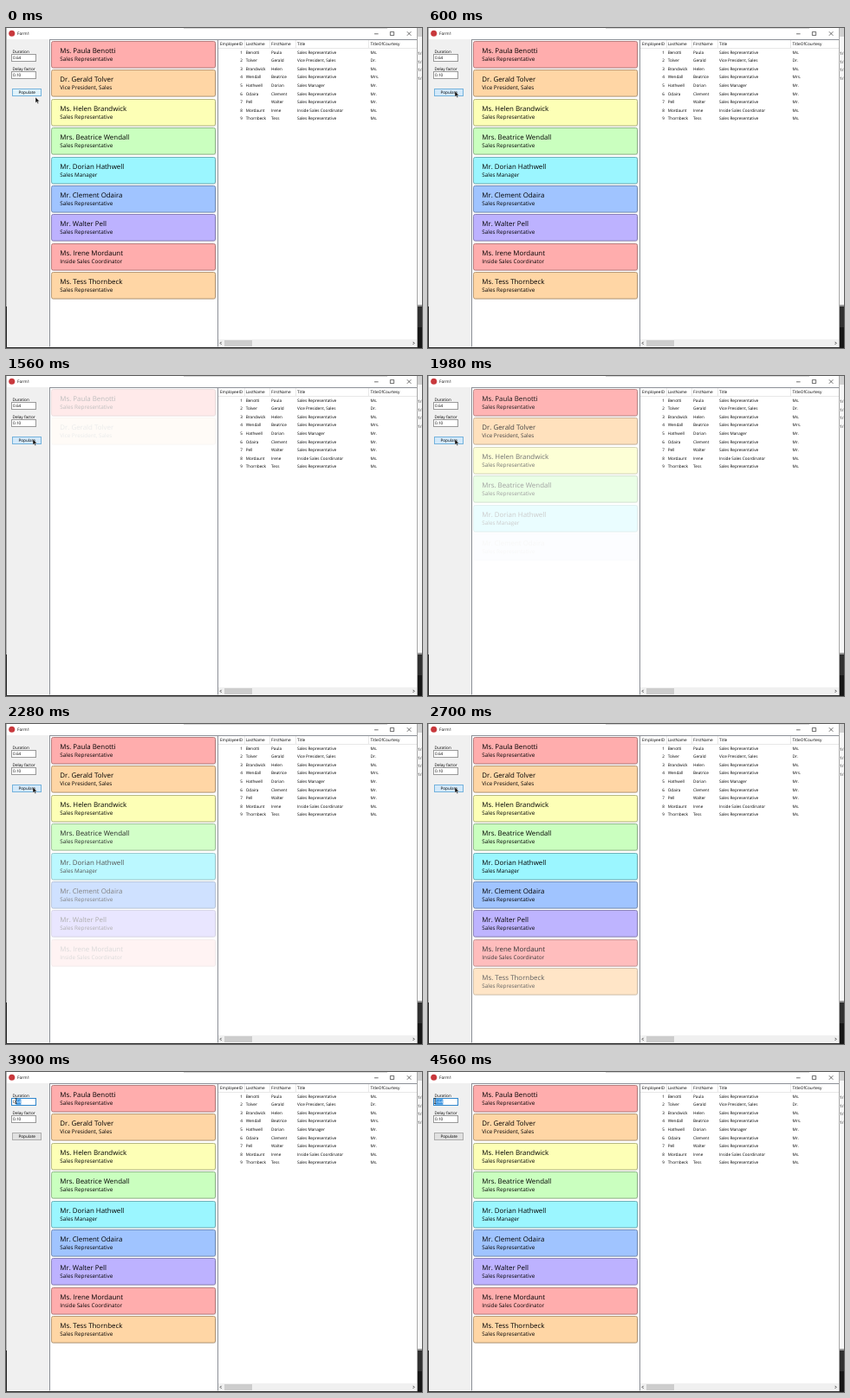
Write an HTML page that moves like this. It is 480 px wide and 370 px high and loops after 4.62 s.

```html
<!DOCTYPE html>
<html lang="en">
<head>
<meta charset="utf-8">
<title>Form1</title>
<style>
  html, body { margin: 0; width: 100%; height: 100%; overflow: hidden; background: #fff; }
  svg { display: block; width: 480px; height: 370px; }
  text {
    font-family: "Open Sans", "Noto Sans", sans-serif; font-size: 4.7px; fill: #000;
    white-space: pre; text-rendering: geometricPrecision;
  }
  .name { font-size: 7.9px; }
  .job { font-size: 6.33px; }
  .end { text-anchor: end; }
  .mid { text-anchor: middle; }
</style>
</head>
<body>
<svg id="stage" viewBox="0 0 480 370" xmlns="http://www.w3.org/2000/svg"></svg>
<script>
const LOOP = 4620, CLEAR = 1400, STEP = 113, FADE = 640, FOCUS = 3600;
const PITCH = 33.4, ROW = 9.55;
const colors = ['#ffadad', '#ffd6a5', '#fdffb6', '#caffbf', '#9bf6ff', '#a0c4ff', '#bdb2ff'];
const rep = 'Sales Representative';
const people = [
  ['Benotti', 'Paula', rep, 'Ms.'],
  ['Tolver', 'Gerald', 'Vice President, Sales', 'Dr.'],
  ['Brandwick', 'Helen', rep, 'Ms.'],
  ['Wendall', 'Beatrice', rep, 'Mrs.'],
  ['Hathwell', 'Dorian', 'Sales Manager', 'Mr.'],
  ['Odaira', 'Clement', rep, 'Mr.'],
  ['Pell', 'Walter', rep, 'Mr.'],
  ['Mordaunt', 'Irene', 'Inside Sales Coordinator', 'Ms.'],
  ['Thornbeck', 'Tess', rep, 'Ms.']
];

const rect = (x, y, w, h, fill, more = '') =>
  `<rect x="${x}" y="${y}" width="${w}" height="${h}" fill="${fill}" ${more}/>`;
const box = (x, y, w, h, fill, stroke, more = '') =>
  rect(x + .5, y + .5, w - 1, h - 1, fill, `stroke="${stroke}" ${more}`);
const label = (x, y, s, cls = '') => `<text x="${x}" y="${y}" class="${cls}">${s}</text>`;
const line = (d, color, width = 1) =>
  `<path d="${d}" fill="none" stroke="${color}" stroke-width="${width}"/>`;

function desktop() {
  let s = rect(0, 0, 480, 370, '#fff') + rect(475, 0, 5, 10, '#d0d0d0') +
    rect(475, 10, 5, 310, '#f7f7f7') + rect(475, 320, 5, 2, '#9a9a9a') +
    rect(475, 322, 5, 24, '#303030') + rect(475, 346, 5, 24, '#161616');
  for (let i = 0; i < 4; i++) s += label(475, 31.3 + i * ROW, '1/');
  return s + line('M474.5 0V369', '#a8a8a8');
}

function frame() {
  return rect(0, 0, 474, 369, '#fff') + rect(1, 13, 50, 355, '#f0f0f0') +
    rect(0, 0, 1, 322, '#b4b4b4') + rect(0, 322, 1, 48, '#222') +
    rect(0, 369, 475, 1, '#333') + rect(205, 0, 235, .6, '#bbb') +
    '<circle cx="6.7" cy="6.3" r="3.5" fill="#c8383c"/>' + label(13, 8.3, 'Form1') +
    line('M425 6.8h4.6M443.4 4.4h4.2v4.2h-4.2zM462.8 4.2l4.6 4.6m0-4.6l-4.6 4.6', '#333', .7) +
    line('M51 13.5H474M50.5 13V368.5M244.5 13V368.5', '#8c9097');
}

function form() {
  return label(7.5, 28.8, 'Duration') + label(7.5, 48.8, 'Delay factor') +
    box(6, 30, 29, 9, '#fff', '#999', 'id="field"') + label(8, 36.3, '0.64') +
    rect(8, 31.3, 0, 6.4, '#3390e0', 'id="mark"') +
    `<clipPath id="picked">${rect(8, 31, 0, 7, '#000', 'id="pickedBox"')}</clipPath>` +
    '<g clip-path="url(#picked)"><text x="8" y="36.3" style="fill:#fff">0.64</text></g>' +
    box(6, 50, 29, 9, '#fff', '#999') + label(8, 56.4, '0.10') +
    box(7, 70, 34, 9, '#e1e1e1', '#adadad', 'id="button"') + label(24.2, 76.3, 'Populate', 'mid');
}

function card([last, first, job, title], i) {
  const clip = (id, y, h) => `<clipPath id="${id}">${rect(55, y, 185, h, '#000')}</clipPath>`;
  const fill = colors[i % colors.length];
  return `<g class="card" transform="translate(0 ${Math.round(15 + i * PITCH)})">` +
    rect(52, 0, 191, 32, '#000', 'rx="3" opacity=".1"') +
    rect(52.5, .5, 189, 30.5, fill, `rx="2" stroke="color-mix(in srgb, ${fill} 72%, #000)"`) +
    clip('n' + i, 4, 11.1) + clip('j' + i, 16, 8.6) +
    `<g clip-path="url(#n${i})">${label(62.3, 14, `${title} ${first} ${last}`, 'name')}</g>` +
    `<g clip-path="url(#j${i})">${label(62.3, 23.3, job, 'job')}</g></g>`;
}

function grid() {
  const cols = [276.7, 306, 336, 420.5];
  let s = label(247, 20.3, 'EmployeeID') +
    ['LastName', 'FirstName', 'Title', 'TitleOfCourtesy'].map((h, i) => label(cols[i], 20.3, h)).join('') +
    line('M275.5 14V23M304.5 14V23M334.5 14V23M418.5 14V23M245 23.5H474', '#e2e2e2', .8);
  people.forEach(([last, first, job, title], i) => {
    const y = 29.8 + i * ROW;
    s += label(273, y, i + 1, 'end');
    [last, first, job, title].forEach((v, c) => s += label(cols[c], y, v));
  });
  return s + rect(245, 360, 229, 8.6, '#f0f0f0') + rect(252, 361, 32, 7, '#cdcdcd') +
    line('M248.6 362.9l-1.5 1.5 1.5 1.5M469.6 362.9l1.5 1.5-1.5 1.5', '#333', .9);
}

const pointer = '<path id="arrow" d="M0 0V6.6L1.5 5.2 2.6 7.6 3.7 7.1 2.6 4.8H4.7Z" fill="#111" stroke="#fff" stroke-width=".4"/>' +
  '<path id="beam" d="M-1.2 -3h2.4M0 -3V3M-1.2 3h2.4" fill="none" stroke="#222" stroke-width=".7"/>';

const stage = document.getElementById('stage');
stage.innerHTML = desktop() + frame() + form() + people.map(card).join('') + grid() + pointer;
const [field, mark, pickedBox, button, arrow, beam] =
  ['field', 'mark', 'pickedBox', 'button', 'arrow', 'beam'].map(id => document.getElementById(id));
const cards = [...stage.querySelectorAll('.card')];

const clamp = v => Math.max(0, Math.min(1, v));
const ease = v => v * v * (3 - 2 * v);

// Pointer stops: start, end, x, y
const moves = [[120, 480, 31, 73], [2760, 3180, 26, 33], [FOCUS, 4020, 8, 33.5]];
function pointerAt(t) {
  let x = 34, y = 80;
  for (const [from, to, nx, ny] of moves) {
    const k = ease(clamp((t - from) / (to - from)));
    x += (nx - x) * k;
    y += (ny - y) * k;
  }
  return [x, y];
}

function draw(t) {
  cards.forEach((c, i) => {
    c.style.opacity = t < CLEAR ? 1 : clamp((t - CLEAR - i * STEP) / FADE);
  });

  const [x, y] = pointerAt(t);
  const overField = y < 40, focused = t >= FOCUS;
  arrow.style.display = overField ? 'none' : '';
  beam.style.display = overField ? '' : 'none';
  (overField ? beam : arrow).setAttribute('transform', `translate(${x.toFixed(2)} ${y.toFixed(2)})`);

  const hover = y > 69;
  button.setAttribute('fill', hover ? (t < 300 ? '#e0f3fb' : '#d3e9fa') : '#e1e1e1');
  button.setAttribute('stroke', focused ? '#adadad' : hover ? '#74b2dc' : '#2f86cc');
  field.setAttribute('stroke', focused ? '#2f86cc' : '#999');

  const left = Math.max(8, Math.min(17.4, x));
  for (const el of [mark, pickedBox]) {
    el.setAttribute('x', left);
    el.setAttribute('width', focused ? 17.4 - left : 0);
  }
}

const start = performance.now();
function tick() {
  draw((performance.now() - start) % LOOP);
  requestAnimationFrame(tick);
}
tick();
</script>
</body>
</html>
```
